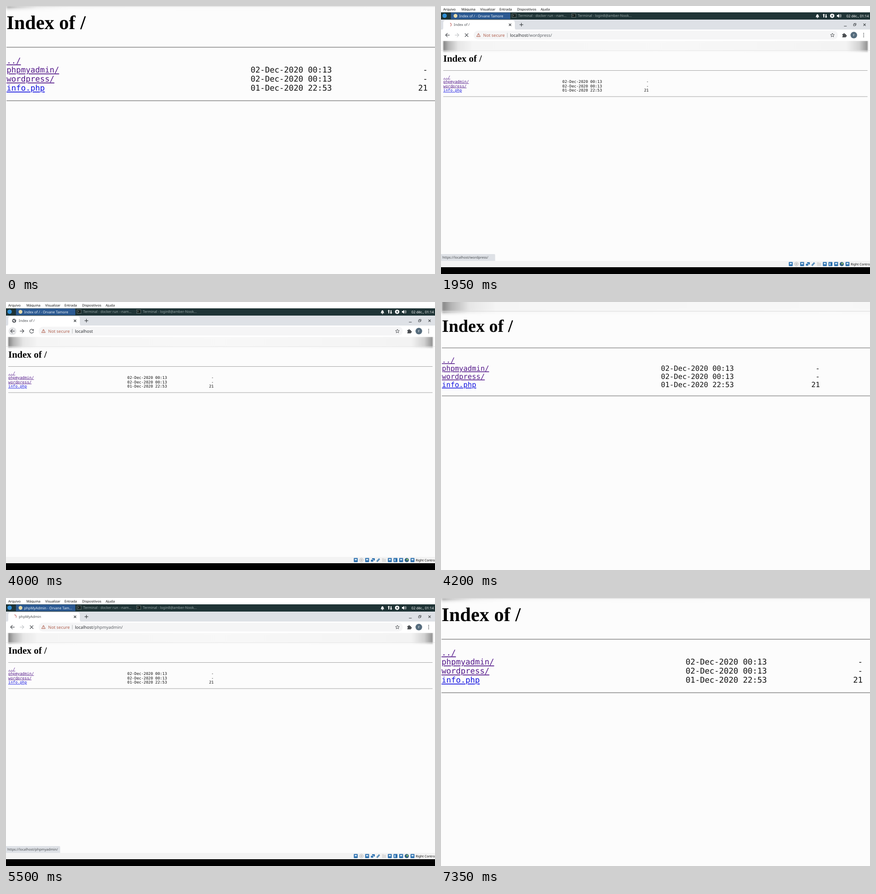
These frames come from a looping animation (947 by 592 pixels, 7950 ms). An HTML page:

```html
<!DOCTYPE html>
<html lang="en">
<head>
<meta charset="utf-8">
<title>Local server index</title>
<style>
html, body { margin: 0; width: 100%; height: 100%; overflow: hidden; background: #fcfcfc; }
svg { display: block; width: 947px; height: 592px; }
text { font-family: "Noto Sans", "Open Sans", sans-serif; text-rendering: geometricPrecision; white-space: pre; }
.mono text { font-family: "DejaVu Sans Mono", monospace; }
.serif { font-family: "Liberation Serif", "Times New Roman", serif; font-weight: bold; }
.form text { font-family: "Open Sans", "Noto Sans", sans-serif; }
.link { text-decoration: underline; }
.line { fill: none; stroke-width: 1.2; }
</style>
</head>
<body>
<svg id="stage" viewBox="0 0 947 592" xmlns="http://www.w3.org/2000/svg"></svg>
<script>
const LOOP = 7950, STEP = 50;

const text = (x, y, size, str, fill = '#111', extra = '') =>
  `<text x="${x}" y="${y}" font-size="${size}" fill="${fill}" ${extra}>${str}</text>`;
const rect = (x, y, w, h, fill, extra = '') =>
  `<rect x="${x}" y="${y}" width="${w}" height="${h}" fill="${fill}" ${extra}/>`;
const circle = (x, y, r, fill, extra = '') =>
  `<circle cx="${x}" cy="${y}" r="${r}" fill="${fill}" ${extra}/>`;
const line = (d, color, extra = '') =>
  `<path class="line" d="${d}" stroke="${color}" ${extra}/>`;
const shape = (d, fill) => `<path d="${d}" fill="${fill}"/>`;
const group = (id, body, extra = '') => `<g id="${id}" ${extra}>${body}</g>`;

function menuBar() {
  const items = [[5, 'Arquivo'], [45, 'Máquina'], [86.5, 'Visualizar'], [129, 'Entrada'],
    [168, 'Dispositivos'], [220, 'Ajuda']];
  return rect(0, 0, 947, 14, '#fff') + items.map(([x, s]) => text(x, 9.6, 7.5, s)).join('');
}

function taskBar() {
  const term = x => rect(x, 17, 9, 8, '#16211f', 'stroke="#7f8f8f" stroke-width=".7"') +
    line(`M${x + 2} 19.5l1.5 1.3-1.5 1.3`, '#ccc', 'style="stroke-width:.8"');
  return rect(0, 14, 947, 16, '#1f3436') +
    circle(8, 21.5, 4.8, '#2f8fd6') +
    rect(22, 14.5, 131, 14.5, '#2c5a92') + circle(32, 21.7, 4.2, '#e6d9a8') +
    text(40, 24.6, 7.75, '', '#eef3f8', 'id="task"') +
    term(157) + text(170.5, 24.3, 7.7, 'Terminal - docker run --nam...', '#9aa9a9') +
    term(288.5) + text(302, 24.3, 7.7, 'Terminal - login8@amber-Nook...', '#9aa9a9') +
    shape('M827 24.5c1.6-1.2 1-5.5 4-6.5 3 1 2.4 5.3 4 6.5zM829.8 25h2.4v1.4h-2.4z', '#fff') +
    shape('M845 17l2.6 3.2h-1.6v5h-2v-5h-1.6zM850 26.5l-2.6-3.2h1.6v-5h2v5h1.6z', '#fff') +
    circle(863.5, 21.7, 4.8, '#fff') + shape('M864.6 18l-3.4 4.2h2l-.8 3.2 3.4-4.4h-2z', '#1f3436') +
    shape('M874 20h2l3-2.6v8.6l-3-2.6h-2z', '#fff') +
    line('M880.4 19.6q1.6 2.1 0 4.2M882 18q2.8 3.7 0 7.4', '#fff', 'style="stroke-width:.9"') +
    text(895, 24.5, 7.7, '02 déc., 01:14', '#fff');
}

function tabStrip() {
  const ink = '#3c4043';
  return rect(0, 30, 947, 23, '#dee1e6') +
    shape('M0 53q5 0 5-5V37q0-5 5-5H158q5 0 5 5v11q0 5 5 5z', '#fff') +
    group('globe', circle(18, 41.3, 4.4, '#4d5156') +
      shape('M14.6 40q2.6-1 3.4.6l1.8.8-1.6 3.4-1.6-2.4zM18.6 37.6l2.6 1.6-1.6 1z', '#f4f4f4')) +
    group('spin', line('M18.5 37.2A4.2 4.2 0 0 1 22.1 43.5', '#c0605c')) +
    text(28.3, 44, 7.8, '', '#4a4e52', 'id="tab"') +
    line('M149.9 39l5 5m0-5l-5 5M177.5 37.3v8M173.5 41.3h8', ink) +
    line('M889.5 44.5h6M932.5 38.8l5 5m0-5l-5 5', ink) +
    line('M910.5 40.2h4v3.6h-4zM912 40v-1.6h4.2v3.8h-1.6', ink, 'style="stroke-width:.9"');
}

function toolBar() {
  const ink = '#4a4d51', warn = '#b0604f';
  return rect(0, 52, 947, 25, '#fff') +
    rect(72, 54.5, 804, 19.5, '#f5f5f6', 'rx="9.7"') +
    group('hover', circle(14.3, 64.3, 8.6, '#e4e5e7')) +
    line('M19 64.3H10.2M14.4 60l-4.3 4.3 4.3 4.3', ink) +
    line('M30.6 64.3h8.8M35.2 60l4.3 4.3-4.3 4.3', ink, 'id="fwd"') +
    group('reload', line('M59.9 61.6A4.3 4.3 0 1 0 60.8 65.4', ink) + shape('M61.2 59.4v4h-4z', ink)) +
    group('stop', line('M52.8 60.6l7.4 7.4m0-7.4l-7.4 7.4', ink)) +
    line('M82.7 60.2l4 7.4h-8z', warn, 'style="stroke-width:1"') +
    line('M82.7 62.6v2.6M82.7 66v.9', warn, 'style="stroke-width:.9"') +
    text(93, 67.5, 9.4, 'Not secure', warn) +
    rect(145.9, 59.5, .8, 10, '#a9abae') +
    text(152.2, 67.5, 9.4, 'localhost<tspan id="path" fill="#5f6368"></tspan>', '#2f3236') +
    line('M864 60l1.2 2.9 3.1.2-2.4 2 .8 3.1-2.7-1.7-2.7 1.7.8-3.1-2.4-2 3.1-.2z', ink, 'style="stroke-width:.9"') +
    shape('M886 62h2.4a1.5 1.5 0 1 1 2.9 0h2.5v2.4a1.5 1.5 0 1 1 0 2.8v2h-7.8v-2.1a1.5 1.5 0 0 0 0-2.9z', ink) +
    circle(911.3, 64.3, 7.3, '#566c7d') + text(911.3, 66.9, 7, 'F', '#e8eef2', 'text-anchor="middle"') +
    [60.6, 64.3, 68].map(y => circle(933, y, 1, ink)).join('');
}

function bookmarks() {
  const spots = [[28, 10, '#f6dccb'], [62, 9, '#c4efc8'], [88, 16, '#e3e3e3'], [155, 36, '#e8e8e8'],
    [220, 9, '#d9dbe0'], [240, 12, '#e6e6e6'], [271, 10, '#ffdca0'], [303, 18, '#e4e4e4'],
    [344, 6, '#cfeacb'], [385, 32, '#e7e7e7'], [438, 7, '#d6d6d6'], [470, 26, '#e2e2e2'],
    [510, 8, '#d8d8d8'], [526, 9, '#e4e4e4'], [556, 8, '#b9b9b9'], [595, 34, '#e3e3e3'], [660, 20, '#e6e6e6']];
  return rect(0, 77, 947, 22, '#fbfbfb') +
    group('smear', rect(5, 76, 937, 24, 'url(#fade)', 'filter="url(#soft)"')) +
    group('spots', rect(-2, 70, 951, 28.5, '#f5f5f5') +
      `<g filter="url(#haze)">${rect(-4, 71, 9, 27, '#555')}` +
      spots.map(([x, w, c]) => `<ellipse cx="${x}" cy="85" rx="${w}" ry="6.5" fill="${c}"/>`).join('') + '</g>') +
    rect(0, 98.2, 947, .6, '#dcdcdc');
}

function indexPage() {
  const size = 8.56, pitch = 5.153, col = n => 5 + n * pitch;
  const rows = [['../', 'up'], ['phpmyadmin/', 'pma', '02-Dec-2020 00:13', '-'],
    ['wordpress/', 'blog', '02-Dec-2020 00:13', '-'], ['info.php', 'info', '01-Dec-2020 22:53', '21']];
  const list = rows.map(([name, id, date, bytes], i) => {
    const y = 160 + i * 9.77;
    return text(5, y, size, name, id === 'info' ? '#1414e0' : '#551a8b', `class="link" id="${id}"`) +
      (date ? text(col(51), y, size, date) + text(col(88 - bytes.length), y, size, bytes) : '');
  }).join('');
  return text(5, 123, 21, 'Index of /', '#000', 'style="font-family:\'Liberation Serif\',serif;font-weight:bold"') +
    rect(5, 142, 936.5, 1, '#a2a2a2') + rect(5, 199.6, 936.5, 1, '#a2a2a2') + `<g class="mono">${list}</g>`;
}

function installPage() {
  const ink = '#444', blue = '#1c6aa8';
  const body = (x, y, s) => text(x, y, 9, s, ink);
  const label = (y, s) => text(238.4, y, 8.8, s, '#333', 'font-weight="bold"');
  const field = (y, h, color, w = .8) =>
    rect(344.5, y, 143.5, h, '#fff', `rx="2.5" stroke="${color}" stroke-width="${w}"`);
  return rect(0, 98.8, 938, 465, '#f0f0f0') +
    rect(938, 98.8, 9, 465, '#f4f4f4') + rect(938.7, 109, 7.3, 348, '#c1c1c1') +
    shape('M939.8 104.8l2.4-3 2.4 3zM939.8 556.5l2.4 3 2.4-3z', '#666') +
    circle(468.8, 146, 28, '#0c6ca6') +
    rect(225.5, 191, 486.5, 380, '#fdfdfd', 'stroke="#e2e2e2" stroke-width=".7"') +
    text(238.4, 221, 15.2, 'Welcome', '#666') + rect(238, 229.3, 461, .9, '#dadada') +
    body(238.4, 250.4, 'Welcome to the famous five-minute WordPress installation process! Just fill in the information below and') +
    body(238.4, 264.4, 'you’ll be on your way to using the most extendable and powerful personal publishing platform in the world.') +
    text(238.4, 297.2, 15.2, 'Information needed', '#666') + rect(238, 305.8, 461, .9, '#dadada') +
    body(238.4, 329.4, 'Please provide the following information. Don’t worry, you can always change these settings later.') +
    label(360.2, 'Site Title') + field(350.5, 19.5, blue, 1.5) +
    label(393.4, 'Username') + field(383.5, 19.5, '#d5d5d5') +
    body(343.8, 415.6, 'Usernames can have only alphanumeric characters, spaces, underscores, hyphens,') +
    body(343.8, 429.4, 'periods, and the @ symbol.') +
    label(457.6, 'Password') + field(448, 19.5, '#8fc882') +
    text(348, 461.2, 9.7, 'IGD2dfoY@lWIZQw06Y', '#444') +
    rect(344.5, 467.5, 143.5, 16.8, '#c1e1b9', 'stroke="#86c277" stroke-width=".8"') +
    text(415.8, 479, 9, 'Strong', '#333', 'text-anchor="middle"') +
    rect(491, 448, 47, 19.5, '#f3f5f6', `rx="2" stroke="${blue}" stroke-width=".9"`) +
    shape('M498.5 457.8q5.7-6.4 11.4 0-5.7 6.4-11.4 0z', blue) + circle(504.2, 457.8, 1.5, '#f3f5f6') +
    line('M499.6 462l9.2-8.4', '#f3f5f6', 'style="stroke-width:2.4"') + line('M499.6 462l9.2-8.4', blue) +
    text(512.6, 461, 8.8, 'Hide', blue) +
    body(343.8, 497.2, '<tspan font-weight="bold">Important:</tspan> You will need this password to log in. Please store it in a secure') +
    body(343.8, 511, 'location.') +
    label(539.4, 'Your Email') + field(530, 19, '#d5d5d5') +
    body(343.8, 561.6, 'Double-check your email address before continuing.');
}

function hostBar() {
  const blue = '#2a6fae';
  const icons = Array.from({ length: 11 }, (_, i) => {
    const x = 772 + i * 12.52;
    if (i === 1) return circle(x, 570, 4.2, '#e2e2e2', 'stroke="#b5b5b5" stroke-width=".8"') + circle(x, 570, 1.2, '#aaa');
    if (i === 4) return line(`M${x - 3.5} 573.5l6-6.5`, '#5f93bd', 'style="stroke-width:3.4"');
    if (i === 5) return shape(`M${x - 4.5} 566h3.5l1 1.2h4.5v7h-9z`, '#dcdcdc');
    if (i === 9) return circle(x, 570, 4.6, '#2d5f82') + circle(x + 1, 569, 2, '#8fbf6a');
    if (i === 3) return rect(x - 1.5, 566, 6, 5, blue) + rect(x - 4.5, 569, 6, 5, blue, 'stroke="#fff" stroke-width=".8"');
    return rect(x - 4.2, 565.6, 8.6, 8.8, blue, 'rx="1"') +
      rect(x - 2.2, 567.6, i % 2 ? 2.2 : 4.6, i % 2 ? 5 : 3, '#dcebf7');
  }).join('');
  return rect(0, 563, 947, 14, '#f3f3f3') + icons + text(904.5, 573, 7.1, 'Right Control') +
    rect(0, 577, 947, 15, '#000');
}

document.getElementById('stage').innerHTML = `<defs>
  <linearGradient id="fade">
    <stop offset="0" stop-color="#808080"/><stop offset=".012" stop-color="#b4b4b4"/>
    <stop offset=".035" stop-color="#e6e6e6"/><stop offset=".07" stop-color="#f5f5f5"/>
    <stop offset=".5" stop-color="#f8f8f8"/><stop offset=".95" stop-color="#f3f3f3"/>
    <stop offset=".98" stop-color="#d2d2d2"/><stop offset="1" stop-color="#8f8f8f"/>
  </linearGradient>
  <filter id="soft" x="-5%" y="-30%" width="110%" height="160%"><feGaussianBlur stdDeviation="1.2 2"/></filter>
  <filter id="haze" x="-5%" y="-30%" width="110%" height="160%"><feGaussianBlur stdDeviation="3"/></filter>
</defs>` + group('cam',
  rect(0, 0, 947, 592, '#fcfcfc') + group('index', indexPage()) + bookmarks() +
  group('install', installPage(), 'class="form"') +
  // the install page sits under the blurred strip
  `<g id="strip">${rect(5, 76, 937, 24, 'url(#fade)', 'filter="url(#soft)"')}</g>` +
  menuBar() + taskBar() + tabStrip() + toolBar() +
  group('status', rect(-3, 548, 122.5, 18, '#dee1e6', 'rx="2"') + text(3, 558.4, 7.6, '', '#4a4e52', 'id="hint"')) +
  hostBar());

const $ = id => document.getElementById(id);
const show = (id, on) => { $(id).style.display = on ? '' : 'none'; };

const HOME = { page: 'index', tab: 'Index of /', task: 'Index of / - Orvane Tamore', path: '', fwd: true };
const BLOG = { page: 'install', tab: 'WordPress › Installation', task: 'WordPress › Installation - Or...',
  path: '/wordpress/wp-admin/install.php' };
const ADMIN = { page: 'admin', tab: 'phpMyAdmin', task: 'phpMyAdmin - Orvane Tam...', path: '/phpmyadmin/' };

const SCENES = [
  [0, HOME],
  [1300, { ...HOME, red: 'blog', hint: 'wordpress' }],
  [1450, { ...HOME, busy: true, hint: 'wordpress', spots: true }],
  [1700, { ...HOME, fwd: false, path: '/wordpress/', busy: true, hint: 'wordpress' }],
  [2100, { ...BLOG, busy: true }],
  [2300, BLOG],
  [3500, { ...HOME, hover: true }],
  [4250, HOME],
  [5200, { ...HOME, red: 'pma', hint: 'phpmyadmin' }],
  [5250, { ...HOME, busy: true, hint: 'phpmyadmin' }],
  [5450, { ...ADMIN, page: 'index', busy: true, hint: 'phpmyadmin' }],
  [5700, { ...ADMIN, busy: true }],
  [5850, ADMIN],
  [6700, { ...HOME, hover: true }],
  [7350, HOME]
];
const ZOOM = [[0, 1], [1400, 1], [1650, 0], [4000, 0], [4250, 1], [5200, 1], [5450, 0], [7100, 0], [7350, 1], [LOOP, 1]];

function zoomAt(t) {
  const i = ZOOM.findIndex(k => k[0] > t);
  const [t0, a] = ZOOM[i - 1], [t1, b] = ZOOM[i];
  return a + (b - a) * (t - t0) / (t1 - t0);
}

let last;
function applyScene(s) {
  if (s === last) return;
  last = s;
  show('index', s.page === 'index');
  show('install', s.page === 'install');
  show('strip', s.page === 'install');
  show('spots', s.spots);
  show('smear', !s.spots);
  show('hover', s.hover);
  show('stop', s.busy);
  show('reload', !s.busy);
  show('spin', s.busy);
  show('globe', !s.busy);
  show('status', s.hint);
  $('hint').textContent = s.hint ? `https://localhost/${s.hint}/` : '';
  $('fwd').setAttribute('stroke', s.fwd ? '#4a4d51' : '#c4c6c9');
  for (const id of ['tab', 'task', 'path']) $(id).textContent = s[id];
  for (const id of ['pma', 'blog']) $(id).setAttribute('fill', s.red === id ? '#b4553f' : '#551a8b');
}

function draw(now) {
  const t = Math.floor((now % LOOP) / STEP) * STEP;
  applyScene(SCENES.filter(s => s[0] <= t).pop()[1]);
  const z = zoomAt(t), k = 1 + 1.05 * z;
  $('cam').setAttribute('transform', `matrix(${k} 0 0 ${k} ${-9 * z} ${-201 * z})`);
  $('spin').setAttribute('transform', `rotate(${(t - 5500) * .5} 18.5 41.4)`);
}

const start = performance.now();
function tick() {
  draw(performance.now() - start);
  requestAnimationFrame(tick);
}
tick();
</script>
</body>
</html>
```
